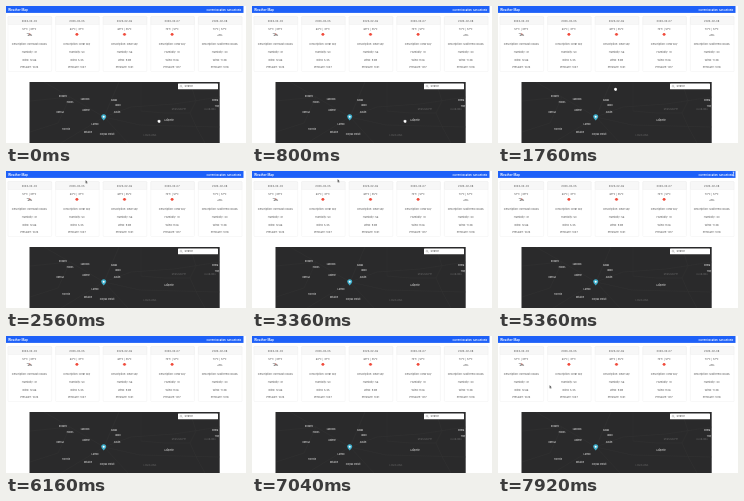
An HTML page for the animation above (8 s loop, 240 by 137 pixels).

```html
<!DOCTYPE html>
<html lang="en">
<head>
<meta charset="utf-8">
<title>Weather Map</title>
<style>
html, body { margin: 0; width: 100%; height: 100%; overflow: hidden; background: #fff; }
svg { display: block; width: 100vw; height: 100vh; }
text { font-family: Inter, "Liberation Sans", sans-serif; font-size: 2.6px; fill: #555; }
.mid { text-anchor: middle; }
.bar { fill: #fff; font-weight: 600; }
.town { font-size: 2.1px; font-weight: 600; fill: #d0d0d0; }
.state { font-size: 2.2px; fill: #6c6c6c; letter-spacing: .15px; }
</style>
</head>
<body>
<svg viewBox="0 0 240 137" preserveAspectRatio="none">
  <rect width="237.5" height="6.9" fill="#1d60f8"/>
  <text class="bar" x="2" y="4.8" style="font-size:3.1px">Weather Map</text>
  <text class="bar" x="235.3" y="4.6" text-anchor="end" style="font-size:2.45px">Current location: San Antonio</text>
  <g id="cards"></g>
  <svg x="23.5" y="76" width="190.2" height="61" viewBox="23.5 76 190.2 61">
    <rect x="23" y="76" width="191" height="61" fill="#2a2a2b"/>
    <g fill="none" stroke="#353536" stroke-width=".4">
      <path d="M24 95L64 91 98 111 125 101 168 98 214 91M55 137L98 111 122 137M98 111L113 76M98 111L134 119 214 121M38 76L64 91 52 117 24 126"/>
      <path d="M135 76V105L158 107H184L190 95 184 76M184 107Q190 122 199 137"/>
    </g>
    <g id="labels"></g>
    <path d="M97.7 114.5Q95.2 112 95.2 110.7A2.5 2.5 0 0 1 100.2 110.7Q100.2 112 97.7 114.5" fill="#3fb1ce"/>
    <circle cx="97.7" cy="110.7" r="1" fill="#fff"/>
    <rect x="172" y="77.5" width="40" height="5.8" rx=".6" fill="#fff"/>
    <circle cx="175" cy="80.1" r=".9" fill="none" stroke="#888" stroke-width=".4"/>
    <path d="M175.7 80.8l.9.9" stroke="#888" stroke-width=".4"/>
    <text x="178.5" y="81.4" fill="#888">Search</text>
  </svg>
  <g id="pointer">
    <path id="arrow" d="M0 0V3.4L.8 2.7 1.3 4 1.9 3.7 1.3 2.5H2.4Z" fill="#333" stroke="#fff" stroke-width=".3"/>
    <path id="hand" d="M-1.3-.7Q0-1.7 1.4-.7L1.5 1Q1 2.1 0 2.1-1 1.8-1.5.5Z" fill="#fff" stroke="#333" stroke-width=".2"/>
    <path id="beam" d="M-.8-1.8H.8M0-1.8V2M-.8 2H.8" fill="none" stroke="#fff" stroke-width=".6"/>
  </g>
</svg>
<script>
const el = id => document.getElementById(id);
const text = (x, y, s, cls = 'mid') => `<text class="${cls}" x="${x}" y="${y}">${s}</text>`;

const sun = '<circle r="1.35" fill="#f04a3a"/><path d="M-1.9 0H1.9" stroke="#f04a3a" stroke-width=".4"/>';
const cloud = '<path d="M-2.8 1.1Q-2.6.2-1.2.3-.3-.5.9.1 2.8 0 2.9 1.1Z" fill="#8a8a8a"/>';
const overcast = '<path d="M-3.2-.9Q-1.5-2 0-.9L1.4.2Z" fill="#999"/><path d="M-1.9 1.3Q-1 .1.4.2 2.4-.3 2.9 1.1L.6.8Z" fill="#333"/><circle cx=".5" cy="-.5" r=".6" fill="#d9665a"/>';

const days = [
  ['57°F | 39°F', overcast, 'overcast clouds', 31, '12.66', 1025],
  ['60°F | 37°F', sun, 'clear sky', 50, '5.45', 1027],
  ['69°F | 45°F', sun, 'clear sky', 56, '9.89', 1021],
  ['72°F | 51°F', sun, 'clear sky', 41, '9.06', 1017],
  ['70°F | 57°F', cloud, 'scattered clouds', 40, '11.28', 1018]
];
el('cards').innerHTML = days.map(([temp, icon, sky, humid, wind, press], i) => {
  const x = 2 + i * 47.6, c = x + 21.3;
  return `<rect x="${x}" y="10.5" width="43.6" height="55" rx=".8" fill="#fff" stroke="#e6e6e6" stroke-width=".3"/>
    <path d="M${x} 18.5V11.2q0-.7.8-.7h42q.8 0 .8.7v7.3z" fill="#f7f7f7" stroke="#e6e6e6" stroke-width=".3"/>`
    + text(c, 16.3, `2023-02-0${i + 4}`) + text(c, 24, temp)
    + `<g transform="translate(${c} 28.4)">${icon}</g>`
    + text(c, 39.1, `Description: ${sky}`) + text(c, 47, `Humidity: ${humid}`)
    + text(c, 54.5, `Wind: ${wind}`) + text(c, 62, `Pressure: ${press}`);
}).join('');

const towns = [
  [57, 91, 'Roswell'], [64, 97, 'Hobbs'], [79, 94, 'Lubbock'], [80, 105, 'Abilene'],
  [108, 95, 'Dallas'], [112, 100, 'Waco'], [111, 107, 'Austin'], [54, 107, 'Odessa'],
  [89, 119, 'Laredo'], [82, 127, 'Mission'], [101, 129, 'Corpus Christi'],
  [60, 124, 'Torreón'], [163, 115, 'Lafayette'], [209, 95, 'Selma'], [211, 101, 'Troy']
];
const states = [
  [173, 104, 'MISSISSIPPI'], [204, 104, 'ALABAMA'], [144, 130, 'LOUISIANA']
];
el('labels').innerHTML = towns.map(([x, y, s]) => text(x, y, s, 'mid town')).join('')
  + states.map(([x, y, s]) => text(x, y, s, 'mid state')).join('');

// Pointer path: time, x, y; it leaves over the top edge and comes back in
const path = [
  [0, 153, 115], [960, 153, 115], [1760, 117.5, 83], [2560, 79.5, 9],
  [3520, 86, 8], [4160, 92.7, 6], [4480, 99, 6], [5280, 235.5, 2.8],
  [5440, 235.5, 2.8], [5600, 237, -6], [7120, 60, -6],
  [7920, 51.5, 49], [8000, 51.5, 49]
];
const show = (id, on) => el(id).setAttribute('visibility', on ? 'visible' : 'hidden');

function frame(now) {
  const t = Math.floor(now % 8000 / 80) * 80;
  const i = path.findIndex(p => p[0] > t);
  const [t0, x0, y0] = path[i - 1], [t1, x1, y1] = path[i];
  const u = (t - t0) / (t1 - t0), k = u * u * (3 - 2 * u);
  const x = x0 + (x1 - x0) * k, y = y0 + (y1 - y0) * k;
  const onMap = x > 24 && x < 213 && y > 76, onText = x > 199 && y < 5;
  el('pointer').setAttribute('transform', `translate(${x} ${y})`);
  show('hand', onMap);
  show('beam', onText);
  show('arrow', !onMap && !onText);
  requestAnimationFrame(frame);
}
requestAnimationFrame(frame);
</script>
</body>
</html>
```
